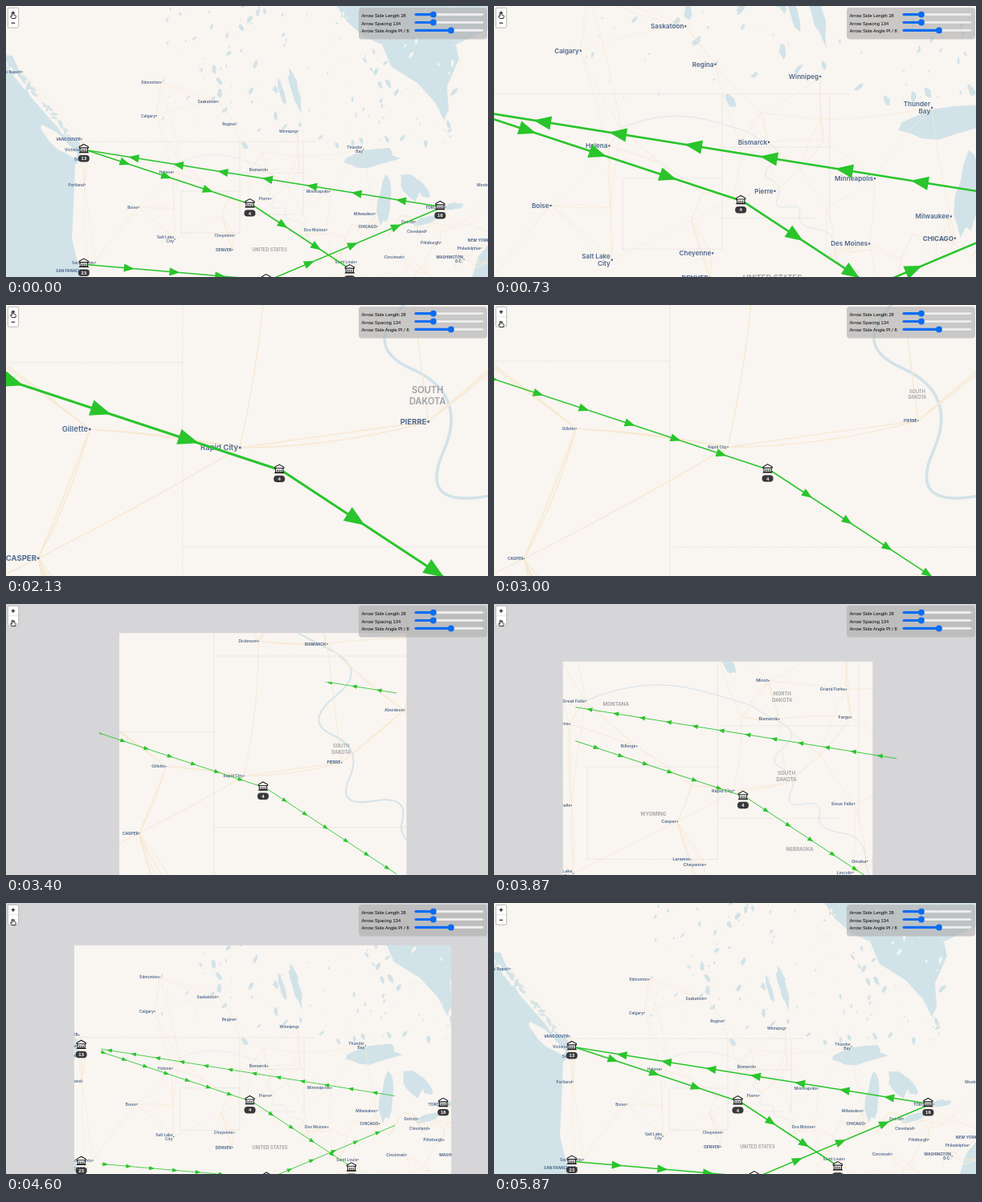
An HTML page with a canvas that plays this animation: 600 by 338 pixels, repeating every 5990 ms.

```html
<!DOCTYPE html>
<html lang="en">
<head>
<meta charset="utf-8">
<title>Route map with arrows</title>
<style>
html, body { margin: 0; width: 100%; height: 100%; overflow: hidden; background: #d6d5d8; }
canvas, svg { position: absolute; left: 0; top: 0; width: 600px; height: 338px; }
#panel text { font: 5.75px "Liberation Sans", Arial, sans-serif; }
#zoom text { font: bold 9px "Liberation Sans", Arial, sans-serif; text-anchor: middle; }
</style>
</head>
<body>
<canvas id="map" width="600" height="338"></canvas>
<svg viewBox="0 0 600 338">
  <g id="zoom">
    <rect x="2.3" y="2.3" width="13.4" height="24.9" rx="2" fill="#fff" stroke="#b9b8b6"/>
    <path d="M3 14.7H15" stroke="#ccc" stroke-width=".5"/>
    <text x="9" y="11.8">+</text><text x="9" y="23.8">−</text>
  </g>
  <g id="panel">
    <rect x="439" y="2" width="160" height="39.5" rx="4" fill="#b1b1b1" fill-opacity=".65"/>
  </g>
  <path id="hand" d="M-1.6 0V-3.2Q-.8-4.4 0-3.2V-1.2L2.6-.5Q3.6 0 3.2 1.6L2.6 3.6H-1.6L-3.4.8Q-3.4-.4-1.6.6Z" fill="#fff" stroke="#111" stroke-width=".9"/>
</svg>
<script>
const LOOP = 5990, CX = 301.3, CY = 254, ZOOM_MS = 250;
const LAND = '#f9f5f1', WATER = '#d1e3e8';
const ctx = document.getElementById('map').getContext('2d');
const hand = document.getElementById('hand');
const clamp = v => Math.max(0, Math.min(1, v));

// Settings panel
const panel = document.getElementById('panel');
[['Arrow Side Length 28', 532], ['Arrow Spacing 134', 532], ['Arrow Side Angle PI / 8', 554]].forEach(([name, x], i) => {
  const y = 10.6 + i * 9.9;
  panel.insertAdjacentHTML('beforeend',
    `<text x="442.5" y="${y + 3}">${name}</text>
     <rect x="508.5" y="${y - 1.6}" width="86" height="3.2" rx="1.6" fill="#f0f0f0" stroke="#bbb" stroke-width=".4"/>
     <rect x="508.5" y="${y - 1.6}" width="${x - 508.5}" height="3.2" rx="1.6" fill="#0b6cf2"/>
     <circle cx="${x}" cy="${y}" r="3.9" fill="#0b6cf2"/>`);
});

// Zoom steps; zooming out shows only the tiles at hand (left, right, top from the centre)
const steps = [
  { at: 640, from: 1, to: 2 },
  { at: 1190, from: 2, to: 4 },
  { at: 1925, from: 4, to: 8 },
  { at: 3203, from: 8, to: 4, tiles: [-39, 48, -53] },
  { at: 3722, from: 4, to: 2, tiles: [-97, 76.5, -82] },
  { at: 4391, from: 2, to: 1, tiles: [-213, 249, -198] }
];

// cubic-bezier(0, 0, .25, 1)
function ease(p) {
  let lo = 0, hi = 1;
  for (let i = 0; i < 20; i++) {
    const u = (lo + hi) / 2;
    if (.75 * u * u + .25 * u ** 3 < p) lo = u; else hi = u;
  }
  return lo * lo * (3 - 2 * lo);
}

let seed = 7;
const rnd = () => (seed = seed * 16807 % 2147483647) / 2147483647;

// Places grouped by the zoom levels that name them: "Name x y"; "*" marks a region, "!" a capital
const groups = {
  1: `Prince Rupert 20 82;Edmonton 193 95;Saskatoon 264 119;VANCOUVER 94 166;Victoria 92 179;Seattle 102 191;
    Portland 98 223;DENVER 282 304;CHICAGO 462 275;Milwaukee 459 259;Detroit 509 269;Cleveland 523 281;
    Cincinnati 495 313;Saint Louis 436 319;Pittsburgh 541 295;Philadelphia 591 302;NEW YORK 602 292;
    WASHINGTON/D.C. 570 316;TORONTO 547 251;Montréal 608 223;Sacramento 111 320;SAN FRANCISCO 103 330;
    Thunder/Bay 445 179;*UNITED STATES 328 304`,
  12: `Calgary 187 137;Regina 286 147;Winnipeg 363 156;Boise 165 251;Helena 208 207;Salt Lake/City 210 291;
    Cheyenne 284 286;Minneapolis 403 231;Des Moines 399 279`,
  124: '!Bismarck 325.2 204.3',
  148: '!Pierre 329.6 240.3',
  2: `Great Falls 217 194;Minot 319.6 182.7;Grand Forks 363 187.6;Fargo 365.7 203.3;Sioux Falls 367.5 251.8;
    Laramie 275.6 283;Omaha 374.7 284;Lincoln 366.6 290.3;Idaho Falls 209 252.7;
    *MONTANA 234 196;*NORTH/DAKOTA 327.2 192;*WYOMING 255 257.6;*NEBRASKA 337 277.3;*MINNESOTA 391 216`,
  24: 'Billings 245.6 219.5',
  248: 'Rapid City 300 244.4;!Casper 268.3 261.8;*SOUTH/DAKOTA 329.5 236.2',
  4: 'Dickinson 304.4 203.5;Aberdeen 348.6 224.4',
  48: 'Gillette 276.4 241.5'
};
const places = Object.entries(groups).flatMap(([levels, list]) => list.split(';').map(item => {
  const [, mark, name, x, y] = item.trim().match(/^([*!]?)(.+) (\S+) (\S+)$/);
  return { levels, mark, name, x: +x, y: +y };
}));

// Wobbly ellipse
function blob(path, x, y, rx, ry, turn) {
  const c = Math.cos(turn), s = Math.sin(turn), n = 14;
  for (let i = 0; i < n; i++) {
    const a = i / n * 2 * Math.PI, r = .75 + .45 * rnd();
    const u = rx * r * Math.cos(a), v = ry * r * Math.sin(a);
    path[i ? 'lineTo' : 'moveTo'](x + u * c - v * s, y + u * s + v * c);
  }
  path.closePath();
}

// Oceans, then the lakes
const water = new Path2D(`M-60 55L8 62 30 112 62 149 92 171 95 190 86 198 84 250 82 290 88 315 96 345H-60Z
  M405-10L425 20 445 38 468 48 480 76 512 96 534 120 545 142 551 130 549 100 564 66 560 48 600 30V-10Z
  M600 298L588 312 578 345H600Z`);
[[456, 190, 33, 11, -.15], [471, 244, 8, 30, .1], [503, 226, 11, 17, -.5], [519, 229, 6, 13, -.6],
  [522, 268, 17, 4.5, -.3], [556, 250, 13, 4, -.15], [360, 106, 5, 26, -.3], [343, 108, 3, 18, -.25]]
  .forEach(lake => blob(water, ...lake));
for (let i = 0; i < 200; i++) {
  const size = .5 + 3 * rnd() ** 3;
  blob(water, 190 + 370 * rnd(), -10 + 185 * rnd(), size * 1.7, size * .8, 1 + 1.6 * rnd());
}

// Islands and fjords follow the north-west coast
const islands = new Path2D(), fjords = new Path2D();
blob(islands, 64, 168, 30, 7, .7);
for (let i = 0; i < 70; i++) {
  const x = 75 * rnd(), y = 68 + 1.2 * x, size = 1 + 2.5 * rnd();
  blob(i % 2 ? islands : fjords, x + (i % 2 ? -5 : 4) * rnd(), y, size * 2, size * .6, i % 2 ? .9 : 2.2 * rnd());
}

const river = new Path2D(`M217 194Q250 180 280 188T312 198 326 206 328 220 327 232 332 245 339 252 348 258 360 268 374 284 392 300`);
const borders = new Path2D('M95 169H385M218 283V231H291V169M291 231V283H218M291 208H370V169M291 260H360M370 208V262');

// Roads join every town to its nearest neighbours
const towns = places.filter(p => p.mark !== '*');
for (let i = 0; i < 60; i++) towns.push({ x: 390 + 220 * rnd(), y: 345 - 85 * rnd() ** 1.3 });
const roads = new Path2D();
for (const a of towns) {
  const far = b => Math.hypot(a.x - b.x, a.y - b.y);
  for (const b of [...towns].sort((p, q) => far(p) - far(q)).slice(1, 4)) {
    const bend = .15 * (rnd() - .5);
    roads.moveTo(a.x, a.y);
    roads.quadraticCurveTo((a.x + b.x) / 2 + bend * (b.y - a.y), (a.y + b.y) / 2 - bend * (b.x - a.x), b.x, b.y);
  }
}

const stops = { v: [100, 179.8, 13], m: [306.6, 248, 4], l: [431, 330, 9], s: [100, 322.5, 23], x: [327, 342, 7], t: [543.5, 250.8, 16] };
const routes = ['tv', 'vm', 'ml', 'sx', 'xt'];
const place = (x, y, s) => [CX + (x - CX) * s, CY + (y - CY) * s];
const screen = () => ctx.setTransform(1, 0, 0, 1, 0, 0);

function fill(path, color) {
  ctx.fillStyle = color;
  ctx.fill(path);
}
function line(path, color, width) {
  ctx.strokeStyle = color;
  ctx.lineWidth = width;
  ctx.stroke(path);
}

function drawLand(s) {
  screen();
  ctx.fillStyle = LAND;
  ctx.fillRect(0, 0, 600, 338);
  ctx.setTransform(s, 0, 0, s, CX - CX * s, CY - CY * s);
  fill(water, WATER);
  fill(islands, LAND);
  fill(fjords, WATER);
  line(river, WATER, .45);
  line(roads, '#f7e9d2', .5 / Math.sqrt(s));
  ctx.setLineDash([2 / s, 1 / s]);
  line(borders, '#dcd5d6', .6 / s);
  ctx.setLineDash([]);
}

function drawLabels(level, s, alpha) {
  if (alpha <= 0) return;
  const q = s / level;
  ctx.globalAlpha = alpha;
  for (const { levels, mark, name, x, y } of places) {
    if (!levels.includes(level)) continue;
    const region = mark === '*', size = region ? 5.6 : 4.8, gap = region ? 7.2 : 5.2;
    const text = mark === '!' && level > 2 ? name.toUpperCase() : name;
    const bold = !region && text === text.toUpperCase();
    const lines = text.split('/');
    ctx.setTransform(q, 0, 0, q, ...place(x, y, s));
    ctx.textBaseline = 'alphabetic';
    ctx.textAlign = region ? 'center' : 'right';
    ctx.fillStyle = region ? '#9c9ea1' : '#4c678c';
    ctx.font = `${bold ? 700 : 600} ${size}px Inter, "Open Sans", sans-serif`;
    lines.forEach((part, i) =>
      ctx.fillText(part, region ? 0 : -1, (i - (lines.length - 1) / 2) * gap + size * .36));
    if (!region) ctx.fillRect(-.5, -.65, 1.3, 1.3);
  }
  ctx.globalAlpha = 1;
}

function drawRoutes(level, s) {
  const r = s / level;
  ctx.save();
  screen();
  ctx.beginPath();
  ctx.rect(CX - 360 * r, CY - 305 * r, 720 * r, 610 * r);
  ctx.clip();
  ctx.strokeStyle = ctx.fillStyle = '#29c52b';
  ctx.lineWidth = 1.5;
  for (const [a, b] of routes) {
    const [x0, y0] = place(...stops[a].slice(0, 2), s), [x1, y1] = place(...stops[b].slice(0, 2), s);
    const len = Math.hypot(x1 - x0, y1 - y0) / r, count = Math.ceil(len / 61);
    screen();
    ctx.translate(x0, y0);
    ctx.rotate(Math.atan2(y1 - y0, x1 - x0));
    ctx.scale(r, r);
    ctx.beginPath();
    ctx.moveTo(0, 0);
    ctx.lineTo(len, 0);
    ctx.stroke();
    ctx.beginPath();
    for (let i = 1; i < count; i++) {
      const tip = i * len / count + 3;
      ctx.moveTo(tip, 0);
      ctx.lineTo(tip - 13, 5.1);
      ctx.lineTo(tip - 13, -5.1);
    }
    ctx.fill();
  }
  ctx.restore();
}

const house = new Path2D('M-5.6-2.2L0-5.4 5.6-2.2V-.9H-5.6ZM-4.6-.9V4.3H4.6V-.9M-6 4.9H6');
const pillars = new Path2D('M-2.3.8V3.6M0 .8V3.6M2.3.8V3.6');
function drawMarker([px, py, number], s) {
  const [x, y] = place(px, py, s);
  ctx.setTransform(1, 0, 0, 1, x - 3.1, y - 2);
  fill(house, '#fff');
  line(house, '#1c1c1c', 1.1);
  line(pillars, '#1c1c1c', 1.1);
  ctx.fillStyle = '#38383a';
  ctx.beginPath();
  ctx.roundRect(-7, 8.2, 14, 8.4, 4);
  ctx.fill();
  ctx.fillStyle = '#fff';
  ctx.font = 'bold 6px "Liberation Sans", Arial, sans-serif';
  ctx.textAlign = 'center';
  ctx.textBaseline = 'alphabetic';
  ctx.fillText(number, 0, 14.5);
}

function drawGap([left, right, top], s, alpha) {
  if (alpha <= 0) return;
  screen();
  ctx.globalAlpha = alpha;
  ctx.fillStyle = '#d6d5d8';
  ctx.beginPath();
  ctx.rect(-200, -300, 1200, 1000);
  ctx.rect(CX + left * s, CY + top * s, (right - left) * s, 900);
  ctx.fill('evenodd');
  ctx.globalAlpha = 1;
}

function frame(now) {
  const t = now % LOOP;
  const step = steps.findLast(k => t >= k.at) || { at: -1000, from: 1, to: 1 };
  const age = t - step.at, out = step.tiles;
  const s = step.from + (step.to - step.from) * ease(clamp(age / ZOOM_MS));
  const fresh = clamp(out ? age / 90 : (age - 200) / 180);

  drawLand(s);
  drawLabels(step.from, s, 1 - fresh);
  drawLabels(step.to, s, fresh);
  if (out) drawGap(out, s, 1 - clamp((age - 290) / 150));
  drawRoutes(age < ZOOM_MS ? step.from : step.to, s);
  for (const k in stops) drawMarker(stops[k], s);

  const down = clamp((t - 2500) / 450);
  hand.setAttribute('transform', `translate(9 ${12 + 12 * down * down * (3 - 2 * down)})`);
  hand.style.display = t < 5330 ? '' : 'none';
  requestAnimationFrame(frame);
}
requestAnimationFrame(frame);
</script>
</body>
</html>
```
